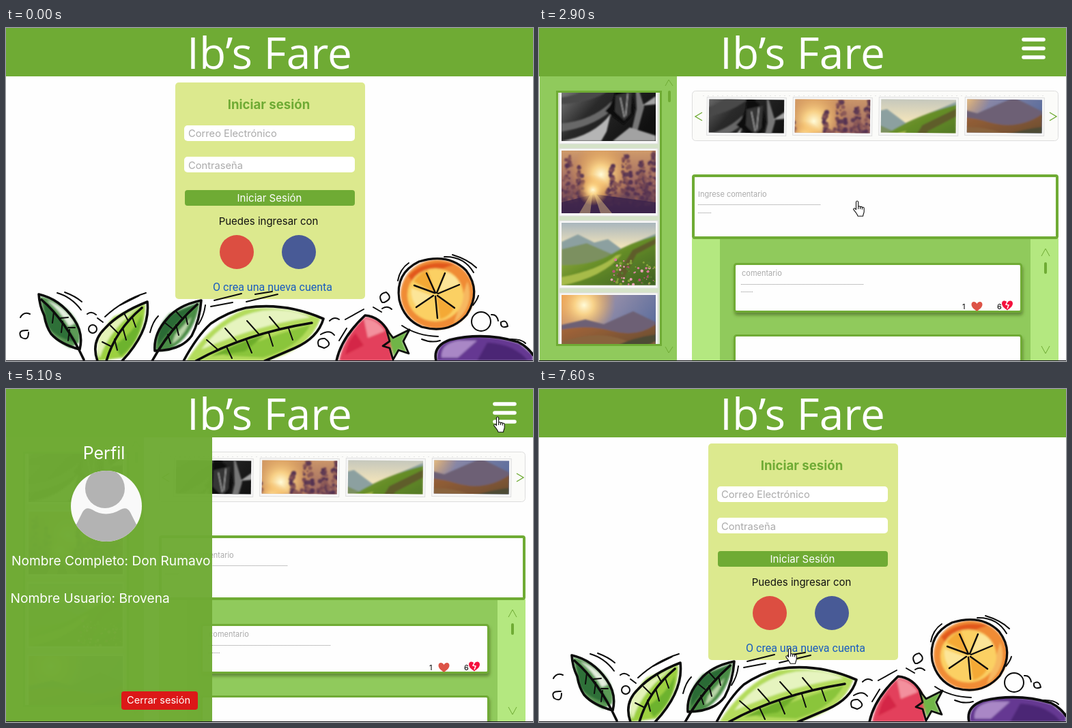
Recreate the animation shown at these times as an HTML page. Size 772 by 489 pixels, loop 8 s.

```html
<!DOCTYPE html>
<html lang="es">
<head>
<meta charset="utf-8">
<title>Ib’s Fare</title>
<style>
html, body { margin: 0; width: 100%; height: 100%; overflow: hidden; background: #fff; }
svg { display: block; }
#stage { width: 100vw; height: 100vh; }
text { font-family: Inter, "Open Sans", sans-serif; }
.ink { fill: none; stroke: #0c0c0c; stroke-linecap: round; stroke-linejoin: round; }
.hint { fill: #aaa; }
.thin { fill: none; stroke: #6fab34; }
.dots { stroke: #8c8c8c; stroke-dasharray: 1 1; }
</style>
</head>
<body>
<svg id="stage" viewBox="0 0 772 489">
<defs>
  <filter id="haze" x="-20%" y="-20%" width="140%" height="140%"><feGaussianBlur stdDeviation=".8"/></filter>
  <filter id="wash" x="-5%" y="-5%" width="110%" height="110%"><feGaussianBlur stdDeviation="1.5"/></filter>
  <filter id="shade" x="-5%" y="-10%" width="110%" height="130%"><feDropShadow dx="1" dy="4" stdDeviation="2" flood-color="#345018" flood-opacity=".5"/></filter>
  <linearGradient id="rock" x2="1" y2=".6"><stop stop-color="#8d8d8d"/><stop offset=".45" stop-color="#2a2a2a"/><stop offset="1" stop-color="#101010"/></linearGradient>
  <linearGradient id="dusk" x2="0" y2="1"><stop stop-color="#cf9a6a"/><stop offset=".55" stop-color="#9a6560"/><stop offset="1" stop-color="#3b2549"/></linearGradient>
  <radialGradient id="sun"><stop stop-color="#fffbd8"/><stop offset=".3" stop-color="#ffd98a" stop-opacity=".9"/><stop offset="1" stop-color="#f0a040" stop-opacity="0"/></radialGradient>
  <linearGradient id="dawn" x2="0" y2="1"><stop stop-color="#a9b6bd"/><stop offset=".4" stop-color="#f4e5bb"/><stop offset="1" stop-color="#b9c199"/></linearGradient>
  <linearGradient id="slope" x2="1" y2="1"><stop stop-color="#a9b84a"/><stop offset=".5" stop-color="#648c27"/><stop offset="1" stop-color="#3c5d23"/></linearGradient>
  <linearGradient id="eve" x2="1" y2=".5"><stop stop-color="#ee9f52"/><stop offset=".5" stop-color="#8f8ba8"/><stop offset="1" stop-color="#5a6c9c"/></linearGradient>
  <linearGradient id="moor" x2="1" y2="1"><stop stop-color="#a9683a"/><stop offset="1" stop-color="#56432f"/></linearGradient>
  <clipPath id="list"><rect x="28" y="95" width="149" height="369"/></clipPath>
  <clipPath id="face"><circle cx="147" cy="172" r="52"/></clipPath>

  <g id="p1">
    <rect width="138" height="92" fill="url(#rock)"/>
    <g filter="url(#haze)">
      <path d="M0 38Q45 36 76 14L92 0H60Q34 24 0 28Z" fill="#4a4a4a"/>
      <path d="M0 92Q48 84 72 52L66 78 58 92Z" fill="#b5b5b5"/>
      <path d="M0 66Q45 62 73 34L70 50Q42 72 0 78Z" fill="#686868"/>
      <path d="M77 4Q108 16 107 50L91 68 64 48Q83 30 77 4Z" fill="#090909"/>
      <path d="M79 25L103 19 101 52 92 62 78 49Z" fill="#363636"/>
      <path d="M108 0L121 42 107 92H99L110 45Z" fill="#777"/>
      <path d="M75 92L100 72 138 84V92ZM118 40L138 26V38Z" fill="#a2a2a2"/>
      <path d="M86 28L92 57M97 22L94 55" stroke="#ccc"/>
    </g>
  </g>
  <g id="p2">
    <rect width="138" height="92" fill="url(#dusk)"/>
    <circle cx="58" cy="35" r="45" fill="url(#sun)"/>
    <g id="trees" filter="url(#haze)"/>
    <path d="M0 92V76L48 64 138 76V92Z" fill="#3d244c" opacity=".85"/>
    <circle cx="46" cy="58" r="23" fill="url(#sun)"/>
    <path d="M46 58L26 92H42ZM46 58L57 92H74Z" fill="#ffdb8d" opacity=".4"/>
  </g>
  <g id="p3">
    <rect width="138" height="92" fill="url(#dawn)"/>
    <g filter="url(#haze)">
      <path d="M0 28L24 17 48 29 68 24 87 38 138 16V60H0Z" fill="#8ca0a0"/>
      <path d="M0 39L37 30 76 47 138 42V80H0Z" fill="#7b9060"/>
      <path d="M0 62Q45 63 73 46T138 19V92H0Z" fill="url(#slope)"/>
      <path d="M0 80Q56 69 80 48L88 46Q62 80 0 92Z" fill="#a7bb48"/>
      <path d="M80 79L104 40 138 23V31L110 46 91 82Z" fill="#5f5d2c"/>
    </g>
    <g id="blooms"/>
  </g>
  <g id="p4">
    <rect width="138" height="92" fill="url(#eve)"/>
    <circle cx="33" cy="15" r="46" fill="url(#sun)"/>
    <g filter="url(#haze)">
      <path d="M0 44L35 36 62 43 82 34 105 24 138 40V70H0Z" fill="#6d6175"/>
      <path d="M0 51Q40 43 75 53T138 43V92H0Z" fill="url(#moor)"/>
      <path d="M0 69Q52 51 91 66T138 66V92H0Z" fill="#89633d"/>
      <path d="M56 92Q82 66 138 58V68L86 92Z" fill="#4d4b35"/>
    </g>
  </g>
  <path id="heart" d="M0 7C-4 4-8 1-8-3C-8-8-2-8 0-4C2-8 8-8 8-3C8 1 4 4 0 7Z"/>
</defs>

<rect width="772" height="489" fill="#fefefe"/>

<g id="login">
  <rect x="248" y="80" width="278" height="318" rx="5" fill="#dce98e"/>
  <g id="art">
    <g filter="url(#wash)">
      <path d="M49 394Q78 398 97 421Q112 440 107 462L94 470Q65 456 57 430Z" fill="#5c9a56"/>
      <path d="M53 399Q86 430 104 462Q72 456 60 437Z" fill="#2f7038"/>
      <path d="M60 400Q88 410 101 434L92 438Q78 413 60 400Z" fill="#e4f0df"/>
      <path d="M204 405Q205 450 172 484L134 489Q130 452 158 424Z" fill="#9cd040"/>
      <path d="M200 407Q152 440 137 485Q128 455 146 437Z" fill="#e4f3b8"/>
      <path d="M199 420Q199 459 168 482L158 466Q186 449 199 420Z" fill="#6db32d"/>
      <path d="M284 402Q276 454 238 473L219 474Q218 441 240 419Z" fill="#4a8c45"/>
      <path d="M281 404Q244 438 223 466Q220 440 241 421Z" fill="#2b6a34"/>
      <path d="M272 424Q262 453 243 464L248 450Z" fill="#b9d5a8"/>
      <path d="M264 489Q300 433 350 413Q408 406 461 426Q444 473 380 489Z" fill="#b4dc5c"/>
      <path d="M286 472Q322 424 376 415Q420 411 446 425Q371 435 286 472Z" fill="#e6f4bf"/>
      <path d="M318 481Q386 451 446 436Q428 470 377 484Z" fill="#8ac53a"/>
      <path d="M300 482Q340 460 380 450L350 475Z" fill="#6eae2c"/>
      <path d="M488 489Q493 456 526 424Q550 427 562 447L566 489Z" fill="#e3405b"/>
      <path d="M524 426Q545 428 555 445L530 455Z" fill="#f3909d"/>
      <path d="M497 480Q500 460 512 448L524 466Z" fill="#d42646"/>
      <path d="M558 443L567 455 590 444 581 460 588 478 575 472 568 484 564 468Z" fill="#6fb546"/>
      <path d="M631 489Q628 466 652 457Q700 446 752 463L772 480V489Z" fill="#653892"/>
      <path d="M638 484Q636 464 662 459L690 459 662 484Z" fill="#a987c6"/>
      <path d="M705 462Q745 464 765 489H690Z" fill="#4b2574"/>
      <ellipse cx="632" cy="391" rx="54" ry="51" fill="#f08c34"/>
      <path d="M589 364Q613 338 657 347L630 357 600 378Z" fill="#e2581f"/>
      <path d="M676 372Q688 408 656 434L668 396Z" fill="#f7b860"/>
      <ellipse cx="629" cy="392" rx="41" ry="39" fill="#fbd063"/>
      <path d="M629 390L597 372Q607 358 618 356ZM630 393L657 411Q650 424 636 428Z" fill="#f4a936"/>
      <path d="M633 388L645 358Q660 364 665 376ZM626 394L601 409Q592 396 594 382Z" fill="#fce598"/>
    </g>
    <g class="ink" stroke-width="3.6">
      <path d="M48 391Q49 408 56 422Q59 439 66 449Q79 464 108 472Q114 448 99 427Q79 398 48 391ZM52 399Q87 429 114 487"/>
      <path d="M207 402Q166 418 145 441Q124 461 134 489M207 402Q212 444 170 489M199 411Q160 444 147 489"/>
      <path d="M286 400Q252 407 236 427Q216 449 218 474Q256 474 272 452Q284 429 286 400ZM280 406Q239 443 214 489"/>
      <path d="M260 489Q280 452 300 434Q325 417 351 411Q408 402 465 427Q457 455 423 470L379 489M448 433Q350 449 278 489"/>
      <path d="M484 489Q491 455 526 422Q548 424 560 446"/>
      <path d="M557 442L567 455 591 443 582 460 590 478 575 473 567 487 562 470 552 467 562 460Z" stroke-width="2.8"/>
      <path d="M630 489Q625 467 650 458Q700 446 750 461Q764 468 772 480"/>
      <path d="M576 399Q570 360 605 343Q648 330 674 356Q697 386 675 421Q650 450 609 439Q583 428 576 399Z" stroke-width="3.2"/>
    </g>
    <g class="ink" stroke-width="2">
      <path d="M70 417L68 433M83 431L81 447M93 443L91 459M80 426L91 425M91 440L101 440"/>
      <path d="M185 425L190 439M171 440L176 458M159 457L163 473M179 430L173 419M164 448L153 437M153 467L141 461"/>
      <path d="M263 422L266 435M249 436L253 451M237 450L241 463M258 426L249 416M243 441L233 433"/>
      <path d="M414 441L420 458M385 448L391 467M352 458L360 477M323 468L331 485M401 442L386 424M370 449L353 430M337 459L321 441M310 472L294 458"/>
      <path d="M628 389L598 378M629 389L616 360M631 389L643 360M633 390L664 377M632 393L657 411M629 394L632 426M626 393L601 410" stroke-width="2.4"/>
      <path d="M21 425Q26 416 35 420M32 444Q16 443 22 454Q33 461 33 447"/>
      <path d="M75 389Q96 395 110 414M86 388Q102 394 111 402M119 420Q125 415 132 421M134 426l8 6"/>
      <path d="M145 424Q172 399 205 389M167 407L195 393M211 447Q215 431 223 423"/>
      <path d="M282 435Q290 423 292 407M300 409L332 403M305 400L345 390M352 402L398 391M365 391L390 387"/>
      <path d="M474 430Q481 423 488 428M461 450Q474 442 481 451M458 467Q454 455 467 456Q480 465 466 470ZM488 459L499 441M497 428L524 413"/>
      <path d="M551 403Q543 391 557 388Q568 397 554 403ZM551 412Q559 407 565 413M538 410L550 417"/>
      <path d="M642 336Q671 335 685 359M654 333Q677 340 689 352M580 437Q602 452 633 453M609 457Q623 463 636 459M574 371Q577 354 590 345"/>
      <circle cx="696" cy="431" r="14"/>
      <path d="M711 421Q719 420 721 430M725 432Q733 427 735 438Q724 442 725 432M737 457Q754 456 761 463M684 407Q690 400 692 393"/>
      <circle cx="127" cy="442" r="6"/>
    </g>
  </g>
  <g fill="#fff">
    <rect x="261" y="143" width="250" height="23" rx="5"/>
    <rect x="261" y="189" width="250" height="23" rx="5"/>
  </g>
  <rect x="262" y="238" width="249" height="23" rx="4" fill="#6fab34"/>
  <g text-anchor="middle" font-size="15">
    <text x="385" y="119" font-size="18.6" font-weight="700" fill="#6fab34">Iniciar sesión</text>
    <text x="386" y="255" fill="#fff">Iniciar Sesión</text>
    <text x="384.5" y="289" fill="#111">Puedes ingresar con</text>
    <text x="390.5" y="386" font-size="16" fill="#175bc0" style="font-family:Roboto,sans-serif">O crea una nueva cuenta</text>
  </g>
  <g font-size="14.7">
    <text class="hint" x="267" y="160">Correo Electrónico</text>
    <text class="hint" x="267" y="207">Contraseña</text>
  </g>
  <circle cx="338" cy="329" r="25" fill="#dc4e41"/>
  <circle cx="429" cy="329" r="25" fill="#485a96"/>
</g>

<g id="home">
  <rect x="1" y="71" width="201" height="418" fill="#90ca5c"/>
  <rect x="26.5" y="93.5" width="152" height="372" fill="#d5e3c8" stroke="#6fab34" stroke-width="3"/>
  <g id="side" clip-path="url(#list)"/>
  <path class="thin" d="M185 85l5-9 6 9M185 468l5 9 6-9"/>
  <rect x="189" y="92" width="4" height="17" rx="2" fill="#6fab34"/>
  <rect x="224.5" y="92.5" width="536" height="73" rx="5" fill="#fbfbf9" stroke="#ddd"/>
  <path d="M240 99.5H740" stroke="#e4e4e4" stroke-dasharray="2 5"/>
  <g id="reel"/>
  <path class="thin" stroke-width="1.4" d="M239 124l-10 6 10 6M748 124l10 6-10 6"/>
  <rect x="224" y="309" width="537" height="180" fill="#b4e880"/>
  <rect x="265" y="309" width="455" height="180" fill="#90ca5c"/>
  <rect x="226" y="217" width="533" height="91" rx="2" fill="#fefefe" stroke="#6fab34" stroke-width="4"/>
  <g fill="#fefefe" stroke="#6fab34" stroke-width="3" filter="url(#shade)">
    <rect x="286.5" y="346.5" width="420" height="70" rx="3"/>
    <rect x="286.5" y="451.5" width="420" height="70" rx="3"/>
  </g>
  <g font-size="11">
    <text class="hint" x="233" y="248">Ingrese comentario</text>
    <text class="hint" x="297" y="364">comentario</text>
    <text x="620" y="413">1</text>
    <text x="671" y="413">6</text>
  </g>
  <path class="dots" d="M233 259.5H413M233 271.5H252M296 376.5H475M296 387.5H314"/>
  <use href="#heart" x="641.5" y="409" fill="#dd5347"/>
  <use href="#heart" x="686" y="407.5" fill="#f4123e"/>
  <path d="M686 402l-2 4 4 1-2 5" fill="none" stroke="#fff" stroke-width="1.5"/>
  <path class="thin" d="M736 335l6-11 6 11M736 467l6 11 6-11"/>
  <rect x="740" y="344" width="4" height="17" rx="2" fill="#6fab34"/>
</g>

<g id="menu">
  <rect y="71" width="302" height="418" fill="#6fab34" opacity=".97"/>
  <g clip-path="url(#face)">
    <rect x="95" y="120" width="104" height="104" fill="#f9f9f9"/>
    <circle cx="145" cy="146" r="29" fill="#b3b3b3"/>
    <path d="M103 199L112 181Q117 172 126 177Q146 190 168 177Q177 172 182 181L191 199V224H103Z" fill="#b3b3b3"/>
  </g>
  <rect x="169" y="444" width="112" height="27" rx="4" fill="#dc1818"/>
  <g fill="#fff">
    <text x="143.5" y="103" font-size="25" text-anchor="middle">Perfil</text>
    <text x="8" y="259" font-size="19.2">Nombre Completo: Don Rumavo</text>
    <text x="6.5" y="314" font-size="19.2">Nombre Usuario: Brovena</text>
    <text x="177" y="461.5" font-size="14.6">Cerrar sesión</text>
  </g>
</g>

<rect width="772" height="71" fill="#6fab34"/>
<text x="386" y="60" font-size="64" text-anchor="middle" fill="#fff" style="font-family:'Open Sans',sans-serif">Ib’s Fare</text>
<path id="burger" d="M710 17H739M710 30H739M710 43H739" stroke="#fff" stroke-width="5.6" stroke-linecap="round"/>
<path d="M0 488.5H772" stroke="#17171c"/>

<g id="cursor" fill="#fff" stroke="#111" stroke-width="1.1" stroke-linejoin="round">
  <path id="arrow" d="M.5.5V16l3.7-3.5 2.6 6.2 2.6-1.1-2.6-6.1h5z"/>
  <path id="hand" d="M4.5 3c0-2.6 3.2-2.6 3.2 0v6.6c.6-1.3 2.8-1.1 2.9.3 .8-1 2.7-.6 2.8.7 .9-.8 2.8-.3 2.8 1.4v4.5c0 2.4-1.4 3.6-1.6 6.7H7C6.3 20 4 17.8 1.1 14.2c-1.2-1.7.8-3.2 2.2-1.8l1.2 1.2zM7.7 9.6V13M10.6 10V13M13.4 10.7V13.5"/>
</g>
</svg>
<script>
const $ = id => document.getElementById(id);
const show = (id, on) => $(id).setAttribute('display', on ? 'inline' : 'none');

let seed = 7;
const rand = () => (seed = seed * 16807 % 2147483647) / 2147483647;
const pick = list => list[Math.floor(rand() * list.length)];
const dot = (x, y, r, color) =>
  `<circle cx="${x.toFixed(1)}" cy="${y.toFixed(1)}" r="${r.toFixed(1)}" fill="${color}"/>`;

function drawTrees() {
  let out = '';
  for (const [x, top, w] of [[10, 8, 13], [27, 23, 10], [74, 22, 11], [94, 6, 15], [117, 16, 14], [133, 3, 12]]) {
    for (let i = 0; i < 60; i++) {
      const k = rand();
      out += dot(x + (rand() - .5) * 2 * w * (.2 + k * .8), top + k * (80 - top), 1 + rand() * 2.6,
        pick(['#724451', '#5f3a52', '#8b5956', '#543351']));
    }
  }
  $('trees').innerHTML = out;
}

function drawBlooms() {
  let out = '';
  for (let i = 0; i < 75; i++)
    out += dot(72 + rand() * 66, 53 + rand() * 39, .7 + rand() * 1.6,
      pick(['#db799c', '#b94f78', '#e7a3b6', '#547b2c', '#83a139']));
  $('blooms').innerHTML = out;
}

const photo = (n, x, y, w, h, crop, tilt = 0) =>
  `<g transform="rotate(${tilt} ${x + w / 2} ${y + h / 2})">
    <rect x="${x - 3}" y="${y - 3}" width="${w + 6}" height="${h + 7}" fill="#f7f7f7" stroke="#dedede"/>
    <svg x="${x}" y="${y}" width="${w}" height="${h}" viewBox="${crop}" preserveAspectRatio="xMidYMid slice"><use href="#p${n}"/></svg>
  </g>`;

drawTrees();
drawBlooms();
const crops = ['24 10 110 50', '32 5 103 46', '62 14 76 34', '50 26 88 40'];
$('side').innerHTML = crops.map((c, i) => photo(i + 1, 33, 74 + 106 * i, 138, 92, '0 0 138 92')).join('');
$('reel').innerHTML = crops.map((c, i) => photo(i + 1, 249 + 126 * i, 105, 110, 49, c, .6)).join('');

// Cursor stops: time, x, y, hand shape
const stops = [
  [200, 706, 183], [300, 686, 241], [500, 667, 250], [600, 582, 269], [700, 565, 269],
  [1100, 543, 271], [1200, 525, 272], [1300, 505, 272]
];
function glide(start, count, x, y) {
  const [, x0, y0] = stops[stops.length - 1];
  for (let i = 1; i <= count; i++) {
    const k = i / count, e = k * k * (3 - 2 * k);
    stops.push([start + 100 * (i - 1), x0 + (x - x0) * e, y0 + (y - y0) * e, i === count]);
  }
}
glide(1500, 7, 460, 253);
stops.push([3700, 570, 171], [3800, 677, 87]);
glide(4000, 4, 714, 40);
glide(5500, 6, 248, 454);
glide(7000, 7, 361, 380);

function draw(t) {
  const home = t >= 2900 && t < 6600, menu = home && t >= 5100;
  show('login', !home);
  show('home', home);
  show('menu', menu);
  show('burger', home);
  $('burger').setAttribute('transform', menu ? 'translate(6 5)' : '');
  const at = stops.filter(s => s[0] <= t).pop();
  show('cursor', at);
  if (!at) return;
  $('cursor').setAttribute('transform', `translate(${at[1]} ${at[2]})`);
  show('hand', at[3]);
  show('arrow', !at[3]);
}

const began = performance.now();
function tick() {
  draw((performance.now() - began) % 8000);
  requestAnimationFrame(tick);
}
tick();
</script>
</body>
</html>
```
